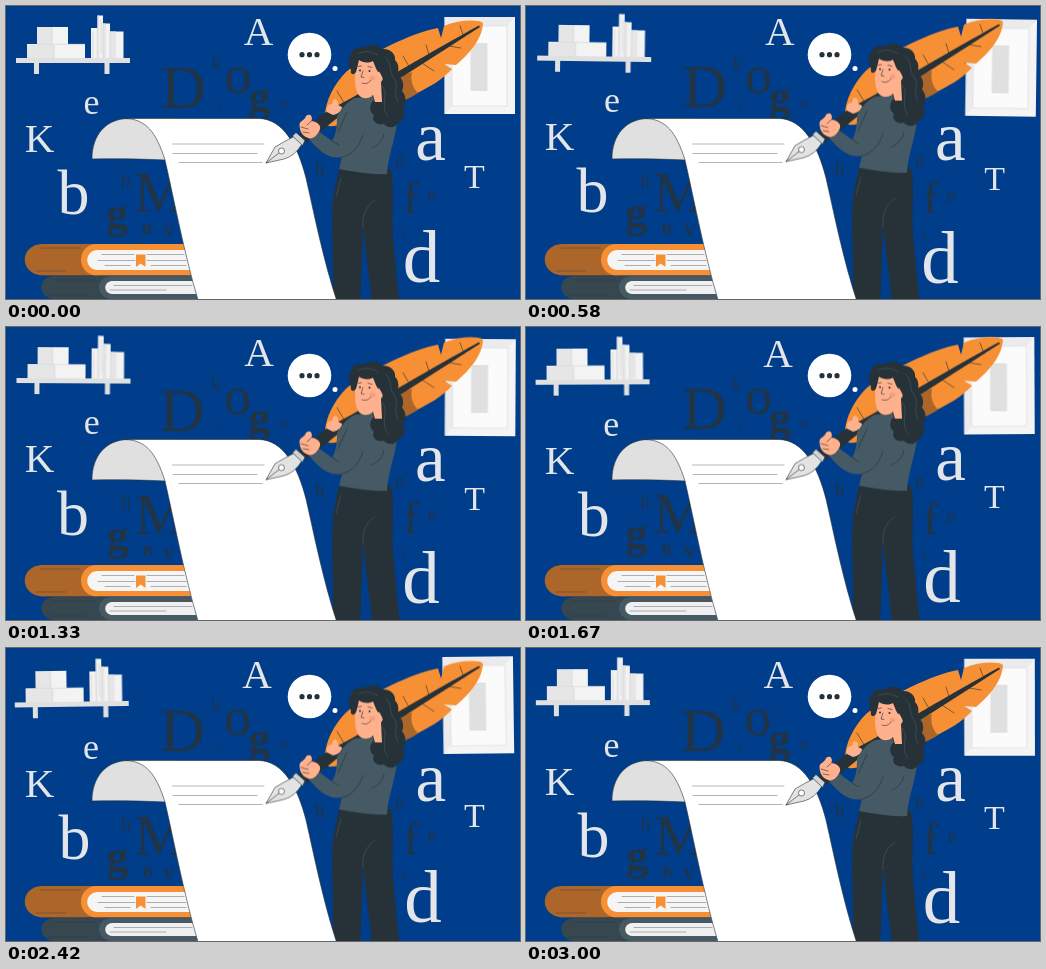
An HTML page without scripts for the animation above (3.04 s loop, 514 px wide and 293 px high).

```html
<!DOCTYPE html>
<html lang="en">
<head>
<meta charset="utf-8">
<title>Writer with a quill</title>
<style>
html, body { margin: 0; width: 100%; height: 100%; overflow: hidden; background: #003e8b; }
svg { display: block; width: 100vw; height: 100vh; }
text { font-family: "Liberation Serif", "Noto Serif", serif; text-anchor: middle; }

/* sway swings between (-x, -y, -r) and (x, y, r), starting at the middle */
.sway {
  --x: 0px; --y: 0px; --r: 0deg;
  transform-box: fill-box;
  transform-origin: center;
  animation: sway 1520ms cubic-bezier(.37, 0, .63, 1) -760ms infinite alternate;
}
.quick { animation-duration: 760ms; animation-delay: -380ms; }
@keyframes sway {
  from { transform: translate(calc(var(--x) * -1), calc(var(--y) * -1)) rotate(calc(var(--r) * -1)); }
  to { transform: translate(var(--x), var(--y)) rotate(var(--r)); }
}
.bob { animation: bob 1520ms cubic-bezier(.37, 0, .63, 1) infinite alternate; }
@keyframes bob { to { transform: translateY(-4.5px); } }

.light { fill: #e3e5e8; }
.dark { fill: #263238; fill-opacity: .84; }
.thin { fill-opacity: .75; }
.bold { font-weight: bold; }
.ink { fill: #263238; }
.skin { fill: #ffb18e; }
.orange { fill: #f79035; }
.brown { fill: #ad662a; }
.slate { fill: #455a64; }
.line { fill: none; stroke: #263238; stroke-width: .6; stroke-linecap: round; }
.faint { stroke-opacity: .6; }
.edge { stroke: #263238; stroke-width: .6; stroke-linejoin: round; }
</style>
</head>
<body>
<svg viewBox="0 0 514 293" preserveAspectRatio="none">
  <rect width="514" height="293" fill="#003e8b"/>

  <!-- shelf -->
  <g class="sway" style="--x:1.5px;--y:-1.8px;--r:.8deg">
    <path fill="#e0e0e0" d="M10 52H124V57H10ZM28 57h5v11h-5ZM98.500 57h5v11h-5Z"/>
    <path fill="#f3f3f3" d="M31 21H62V39H31ZM21 38H79V52H21ZM85 22H91.500V52H85ZM91.500 9.500H97V52H91.500ZM97 17.500H104V52H97ZM104 25.500H117.500V52H104Z"/>
    <path fill="#e6e6e7" d="M31 21H46V38H31ZM21 38.500H48V52H21ZM91.500 9.500h1.500V52h-1.500ZM97 17.500h3V52h-3ZM104 25.500h6V52h-6Z"/>
    <path fill="none" stroke="#cdcfd2" stroke-width=".6" d="M31 38.300H79M48 39V52M46 21V38M91.300 22V52M97 17V52M104 25V52M87 25V52M95 14V48"/>
  </g>

  <!-- picture -->
  <g class="sway" style="--x:1.5px;--y:2.5px;--r:.8deg">
    <path fill="#f4f4f5" d="M438.500 11H509V108H438.500Z"/>
    <path fill="#e3e4e6" d="M438.500 11H509L501 20H446L446 100L438.500 108Z" opacity=".5"/>
    <path fill="#fbfbfb" stroke="#dedfe1" stroke-width=".8" d="M446 20H501V100H446Z"/>
    <path fill="#e0e0e0" d="M464.500 37H481.500V85H464.500Z"/>
  </g>

  <!-- pale letters -->
  <g class="light">
    <text class="sway" style="--x:1.4px;--y:-.4px" x="252.500" y="39.500" font-size="41">A</text>
    <text class="sway" style="--x:.5px;--y:-2.8px" x="85.500" y="108.500" font-size="36">e</text>
    <text class="sway" style="--x:0px;--y:-3px" x="33.500" y="146.500" font-size="41">K</text>
    <text class="sway" style="--x:-1.1px;--y:-2.6px" x="67.500" y="208.500" font-size="64">b</text>
    <text class="sway" style="--x:-.3px;--y:.8px" x="424.500" y="153.500" font-size="69">a</text>
    <text class="sway" style="--x:.2px;--y:2.8px" x="468.500" y="181.500" font-size="34">T</text>
    <text class="sway" style="--x:-1.5px;--y:1.7px" x="415.500" y="275.500" font-size="75">d</text>
  </g>

  <!-- dark letters -->
  <g class="dark">
    <text class="sway quick" style="--x:2px;--y:-1.5px" x="177.500" y="102.500" font-size="62">D</text>
    <text class="sway quick" style="--x:.8px;--y:.6px" x="232" y="87" font-size="54">o</text>
    <text class="sway quick bold" style="--x:.5px;--y:-.5px" x="253.500" y="105" font-size="44">g</text>
    <text class="sway quick thin" style="--x:1px;--y:.3px" x="210" y="63" font-size="18">k</text>
    <text class="sway quick thin" style="--x:.4px;--y:-.6px" x="213" y="104" font-size="11">t</text>
    <text class="sway quick thin" style="--x:.6px;--y:.4px" x="278" y="102" font-size="16">e</text>
    <text class="sway quick thin" style="--x:-.7px;--y:-.5px" x="119.500" y="182" font-size="20">h</text>
    <text class="sway quick" style="--x:-1.2px;--y:-.8px" x="154" y="206.500" font-size="58">M</text>
    <text class="sway quick bold" style="--x:-1px;--y:-1.2px" x="111" y="222" font-size="44">g</text>
    <text class="sway quick bold" style="--x:-.8px;--y:-.7px" x="141" y="228.500" font-size="15">B</text>
    <text class="sway quick bold" style="--x:.8px;--y:-.8px" x="163" y="231" font-size="16">V</text>
    <text class="sway quick thin" style="--x:0px;--y:.6px" x="313.500" y="169" font-size="20">h</text>
    <text class="sway quick thin" style="--x:0px;--y:.6px" x="393.500" y="159" font-size="18">p</text>
    <text class="sway quick" style="--x:-.4px;--y:.7px" x="405" y="206.500" font-size="44">f</text>
    <text class="sway quick thin" style="--x:-.9px;--y:1px" x="425.500" y="195" font-size="20">e</text>
    <text class="sway quick thin" style="--x:-.4px;--y:.8px" x="398.500" y="232" font-size="15">t</text>
  </g>

  <!-- books -->
  <path class="brown" d="M92 238H36C13 239 13 268 36 269.500H92Z"/>
  <path class="orange" d="M180 238H90C70 239 70 268 90 269.500H190Z"/>
  <path fill="#f5f5f5" d="M180 244H91C78 245 78 263 91 264H190Z"/>
  <path class="orange" d="M130 248.500H139.500V261L134.700 257.500L130 261Z"/>
  <path class="line faint" d="M96 248.500H128M141 248.500H178M92 254.500H129M141 254.500H180M99 259.500H124M145 259.500H180M34 242H74M30 265H60"/>
  <path fill="#37474f" d="M106 270H48C31 271 31 291 48 293H106Z"/>
  <path class="slate" d="M195 270H105C89 271 89 291 105 293H195Z"/>
  <path fill="#f0f0f0" d="M195 275H106C97 276 97 287 106 288H195Z"/>
  <path class="line faint" d="M108 279.500H186M104 284H160M47 274H90M44 289H80M36 269.800H190"/>

  <!-- legs -->
  <g class="bob">
    <path class="ink" d="M333 163H385C389 183 385 209 387 230C389 252 391 274 394 302H366C364 271 359 246 357 218C356 249 355 276 354 302H327C328 274 325 219 327 192Z"/>
    <path fill="none" stroke="#546169" stroke-width=".5" d="M357 222C356 209 360 200 369 194M335 172L330 191"/>
  </g>

  <!-- paper -->
  <path class="edge" fill="#e0e0e0" d="M86 153C86 129 100 112.500 123 112.500H170V154H159C137 153 112 152.500 86 153Z"/>
  <path class="edge" fill="#fff" d="M119 112.500H253C277 113 292 140 300 172C308 207 317 253 330.500 294H192C178 247 168 193 159 154C150 126 140 113 119 112.500Z"/>
  <path class="line faint" d="M166.500 138H258M167 147.500H251M173 156.500H256"/>

  <!-- speech bubble -->
  <circle cx="303.500" cy="48.500" r="21.800" fill="#fff"/>
  <circle cx="329" cy="62.500" r="2.500" fill="#fff"/>
  <g class="ink">
    <circle cx="296" cy="48.700" r="2.600"/>
    <circle cx="303.500" cy="48.700" r="2.600"/>
    <circle cx="311" cy="48.700" r="2.600"/>
  </g>

  <g class="bob">
    <!-- feather -->
    <path class="orange" d="M477 17C472 13 452 14 438 20L435 32L432 22C408 26 362 48 340 66C328 78 319 96 319 110L325 114L322 120C340 122 385 101 409 88C422 82 436 74 446 63L438 58L450 59C463 48 476 34 477 17Z"/>
    <path class="brown" d="M396 69L406 66C404 75 407 82 412 87C402 94 389 98 375 102Z"/>
    <path class="line" d="M458 31L454 20M443 40L455 42M424 52L420 39M416 57L428 65M405 64L397 50M340 100L331 85"/>
    <path class="ink" d="M473 19.500L474 21C432 48 383 80 340 105L300 137L292 129C304 119 315 108 329 101C372 78 426 45 473 19.500Z"/>
    <!-- nib -->
    <path class="edge" fill="#e3e3e3" d="M260 157L269 141Q279 135 288 130.500L296 138Q289 150 278 153Z"/>
    <path class="edge" fill="#cfd1d2" d="M286.500 130L290 126.500L299 134.500L296.500 139.500Z"/>
    <path class="line" d="M260 157L273 147"/>
    <circle class="edge" cx="275.500" cy="145" r="3" fill="#fff"/>

    <!-- torso and arms -->
    <path class="skin" d="M321 106C320 101 322 98 326 98L327 94C330 92 333 95 332 99L336 101C336 105 332 108 327 109Z"/>
    <path class="slate" d="M331 110C335 104 340 96 349 92L374 90C388 94 393 104 391 117C389 134 382 150 381 168C367 169 349 166 333 163L336 151C323 154 312 144 303 133L311 124L326 135C331 127 331 117 331 110Z"/>
    <path class="line" d="M336 151C346 149 353 141 357 129M326 135L333 139M341 106C337 115 334 122 332 126M378 128C376 136 371 140 366 142"/>
    <path class="skin" d="M293.500 120C293 114 299 115 300 110C304 107 307 110 305.500 115C313 116 317 121 312 127C309 132 304 134 300 131C296 129 294 125 293.500 120Z"/>
    <path class="line" d="M305.500 115L301 119M295 121L302 123M297 126L303 127"/>

    <!-- head -->
    <path class="ink" d="M350 57C342 60 341 50 346 47C346 42 354 40 358 42C364 37 373 39 376 43C384 42 390 48 389 54C395 60 391 67 392 70C398 73 398 81 396 85C401 90 400 99 397 102C401 109 396 116 392 117C388 124 380 121 378 118C370 120 365 114 368 109C362 105 364 97 368 94Z"/>
    <path class="skin" d="M352 54C348 65 348 81 352 88C356 94 363 93 367 89L369 96L376 96L375 76C380 71 378 62 372 66C369 62 368 56 366 52Z"/>
    <path class="ink" d="M345 64C341 58 344 50 350 47C358 42 370 46 373 54C380 60 382 70 377 74C376 68 370 62 367 55C361 58 356 56 353 54C352 58 351 63 350 66C347 70 344 68 345 64Z"/>
    <path class="line" d="M352 60.500L355.500 60M362 60.500L366 61.500M357 65L355 71L358 71.500M356 77C360 78.500 363 77 365 74"/>
    <circle class="ink" cx="354" cy="64.500" r="1"/>
    <circle class="ink" cx="363.500" cy="65" r="1"/>
    <ellipse cx="366.500" cy="72" rx="2.800" ry="2.200" fill="#f28f6d" opacity=".6"/>
    <path fill="none" stroke="#52616a" stroke-width=".5" d="M379 51C387 57 382 65 388 72C394 80 386 87 392 96M376 80C384 89 373 98 382 111M352 48C360 43 367 47 372 49"/>
  </g>
</svg>
</body>
</html>
```
